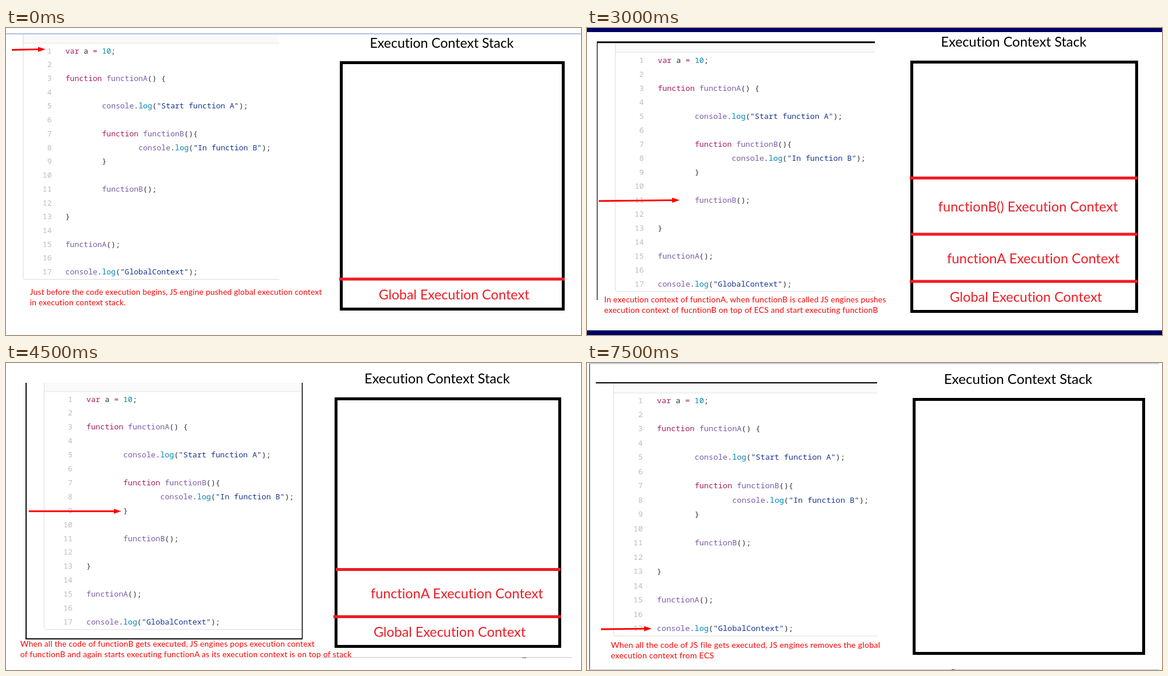
These frames come from a looping animation (987 px wide and 527 px high, 9 s). An HTML page:

```html
<!DOCTYPE html>
<html lang="en">
<head>
<meta charset="utf-8">
<title>Execution context stack</title>
<style>
  html, body { margin: 0; width: 100%; height: 100%; overflow: hidden; background: #fff; }
  svg { display: block; width: 987px; height: 527px; }
  text { white-space: pre; font-variant-ligatures: none; }
  .scene { visibility: hidden; animation: show 9s step-end infinite; }
  @keyframes show {
    0% { visibility: visible; }
    16.6667%, 100% { visibility: hidden; }
  }
  .code { font-family: "Noto Sans Mono", "DejaVu Sans Mono", monospace; fill: #333; }
  .keyword { fill: #a71d5d; }
  .name { fill: #795da3; }
  .builtin { fill: #0086b3; }
  .string { fill: #183691; }
  .number { fill: #bcbcbc; text-anchor: end; }
  .title, .label { font-family: Lato, "Open Sans", sans-serif; text-anchor: middle; }
  .label { fill: #ed1c24; }
  .caption { font-family: Lato, "Open Sans", sans-serif; fill: #f00; letter-spacing: .015em; }
</style>
</head>
<body>
<svg id="stage" viewBox="0 0 987 527"></svg>
<script>
const SOURCE = `var a = 10;

function functionA() {

        console.log("Start function A");

        function functionB(){
                console.log("In function B");
        }

        functionB();

}

functionA();

console.log("GlobalContext");`.split("\n");

const GLOBAL = "Global Execution Context";
const FUNC_A = "functionA Execution Context";
const FUNC_B = "functionB() Execution Context";
const BLUE = "#b4c2de", NAVY = "#000066", GREY = "#dcdcdc", RED = "#ed1c24";

// unit: code character width, code: [x, first baseline, line pitch],
// panel: [left, top, header bottom, right, bottom], box: [left, top, right, bottom],
// dividers: [x1, x2, y], labels: [centre, baseline, text], extras: [x1, y1, x2, y2, width, colour]
const scenes = [
  {
    unit: 7.84, code: [102, 43.5, 23.73], panel: [29.5, 11, 26, 469, 431.5],
    title: [748, 34], box: [573, 57, 959, 485],
    dividers: [[572, 959, 431]], labels: [[769, 466, GLOBAL]],
    arrow: [10, 37.5, 68, 36.5], extras: [[0, 10, 987, 10, 2, BLUE]],
    caption: [41, 458, "Just before the code execution begins, JS engine pushed global execution context",
      "in execution context stack."]
  },
  {
    unit: 8.25, code: [126, 52, 25], panel: [50.5, 17, 34.5, 513, 460.5],
    title: [760.5, 24], box: [576, 49, 982, 499],
    dividers: [[577, 982, 358.5], [574, 982, 442.5]],
    labels: [[795.5, 410, FUNC_A], [782, 479, GLOBAL]],
    arrow: [18, 396, 87, 397],
    extras: [[.5, 0, .5, 527, 1, BLUE], [18, 17, 514, 17, 1.6, "#000"], [18, 476, 514, 476, 1.6, "#000"],
      [18.5, 16, 18.5, 477, 1.3, "#000"], [513.5, 16, 513.5, 477, 1.3, "#000"]],
    caption: [28.5, 492, "When functionA() is called in GEC, JS engine enters functionA execution context",
      "in ECS and start executing functionA"]
  },
  {
    unit: 7.93, code: [121.5, 59.5, 24.03], panel: [48.5, 26, 41.5, 494, 452],
    title: [732.5, 32], box: [555, 56, 946, 489],
    dividers: [[554, 945, 257.5], [556, 945, 354], [554, 945, 435]],
    labels: [[757, 315, FUNC_B], [766, 404, FUNC_A], [753.5, 470, GLOBAL]],
    arrow: [20, 297, 159, 295.5],
    extras: [[0, 3.5, 987, 3.5, 7, NAVY], [0, 523, 987, 523, 8, NAVY],
      [17, 24.5, 494, 24.5, 3, "#000"], [17.5, 23, 17.5, 467, 1.2, "#000"]],
    caption: [29.5, 471, "In execution context of functionA, when functionB is called JS engines pushes",
      "execution context of fucntionB on top of ECS and start executing functionB"]
  },
  {
    unit: 7.92, code: [138, 66.5, 23.9], panel: [65.5, 34, 49, 508, 457.5],
    title: [740, 35], box: [564, 59, 953, 489],
    dividers: [[566, 952, 354.5], [562, 953, 435.5]],
    labels: [[774, 404, FUNC_A], [761.5, 470, GLOBAL]],
    arrow: [39, 254.5, 198, 254.5],
    extras: [[34.5, 34, 34.5, 474, 2, "#000"], [33.5, 473.5, 509, 473.5, 2, "#000"],
      [508.5, 34, 508.5, 474, 1.5, "#000"], [541, 505.5, 971, 505.5, 1, "#c6c6d2"], [886, 506, 893, 506, 1.5, "#888"]],
    caption: [24.5, 487, "When all the code of functionB gets executed, JS engines pops execution context",
      "of functionB and again starts executing functionA as its execution context is on top of stack"]
  },
  {
    unit: 8.13, code: [125.5, 60.5, 24.65], panel: [51, 28, 42.5, 506, 463],
    title: [741, 30.5], box: [559, 55, 960, 499],
    dividers: [[557, 959, 443.5]], labels: [[762.5, 480, GLOBAL]],
    arrow: [21, 350, 124, 351], extras: [],
    caption: [31, 480.5, "When all the code of functionA gets executed, JS engines pops out the functionA",
      "execution context. As after this global execution context is on top of the stack, JS",
      "engine starts executing the global code i.e. console.log(\"GlobalContext\")"]
  },
  {
    unit: 8.08, code: [120, 68.5, 24.47], panel: [45.5, 35, 51.5, 498, 468.5],
    title: [740, 36], box: [559, 60, 958, 501],
    dividers: [], labels: [],
    arrow: [24, 457, 111, 456],
    extras: [[4.5, 0, 4.5, 527, 1, "#223"], [4, 1, 982, 1, 1.5, BLUE], [4, 526.5, 982, 526.5, 1, BLUE],
      [626, 526.5, 631, 526.5, 1, "#333"], [15, 34, 498, 34, 2, "#000"]],
    caption: [41, 488.5, "When all the code of JS file gets executed, JS engines removes the global",
      "execution context from ECS"]
  }
];

const line = (x1, y1, x2, y2, width, colour) =>
  `<line x1="${x1}" y1="${y1}" x2="${x2}" y2="${y2}" stroke-width="${width}" stroke="${colour}"/>`;

const text = (kind, x, y, size, content) =>
  `<text class="${kind}" x="${x}" y="${y}" font-size="${size}">${content}</text>`;

function highlight(source) {
  const token = /"[^"]*"|\b(?:var|function|console|functionA|functionB|log|\d+)\b|=/g;
  return source.replace(token, word => {
    const kind = word[0] === '"' ? "string"
      : /^(var|function|=)$/.test(word) ? "keyword"
      : /^(log|\d+)$/.test(word) ? "builtin" : "name";
    return `<tspan class="${kind}">${word}</tspan>`;
  });
}

function drawCode({ unit, code: [x, y, pitch] }) {
  const size = unit / .6;
  return SOURCE.map((source, row) => {
    const body = source.trimStart();
    const indent = (source.length - body.length) * unit;
    const baseline = y + row * pitch;
    return text("code number", x - 3 * unit, baseline, size, row + 1)
      + text("code", x + indent, baseline, size, highlight(body));
  }).join("");
}

function drawPanel([left, top, header, right, bottom]) {
  return `<rect x="${left}" y="${top}" width="${right - left}" height="${header - top}" fill="#fafafa"/>`
    + line(left, header, right, header, 1, "#e4e4e4")
    + `<path d="M${left} ${top}V${bottom - 3}q0 3 3 3H${right}" fill="none" stroke="${GREY}"/>`;
}

function drawBox([left, top, right, bottom]) {
  return `<rect x="${left + 2.5}" y="${top + 2.5}" width="${right - left - 5}" height="${bottom - top - 5}"
    fill="none" stroke="#000" stroke-width="5"/>`;
}

function drawArrow([x1, y1, x2, y2]) {
  const angle = Math.atan2(y2 - y1, x2 - x1) * 180 / Math.PI;
  const length = Math.hypot(x2 - x1, y2 - y1);
  return `<g transform="translate(${x1} ${y1}) rotate(${angle})" fill="#f00">
    <path d="M0 -1.4H${length - 13}V-4.3L${length} 0L${length - 13} 4.3V1.4H0Z"/></g>`;
}

function drawScene(scene, index) {
  const { unit, title, labels, dividers, extras } = scene;
  const [captionX, captionY, ...captionLines] = scene.caption;
  return `<g class="scene" style="animation-delay:${(index - scenes.length) * 1.5}s">
    <rect width="987" height="527" fill="#fff"/>`
    + drawPanel(scene.panel)
    + extras.map(extra => line(...extra)).join("")
    + drawCode(scene)
    + drawArrow(scene.arrow)
    + text("title", ...title, unit * 2.94, "Execution Context Stack")
    + drawBox(scene.box)
    + dividers.map(([x1, x2, y]) => line(x1, y, x2, y, 5, RED)).join("")
    + labels.map(([x, y, label]) => text("label", x, y, unit * 2.95, label)).join("")
    + captionLines.map((words, row) =>
        text("caption", captionX, captionY + row * unit * 2.3, unit * 1.738, words)).join("")
    + "</g>";
}

document.getElementById("stage").innerHTML = scenes.map(drawScene).join("");
</script>
</body>
</html>
```
